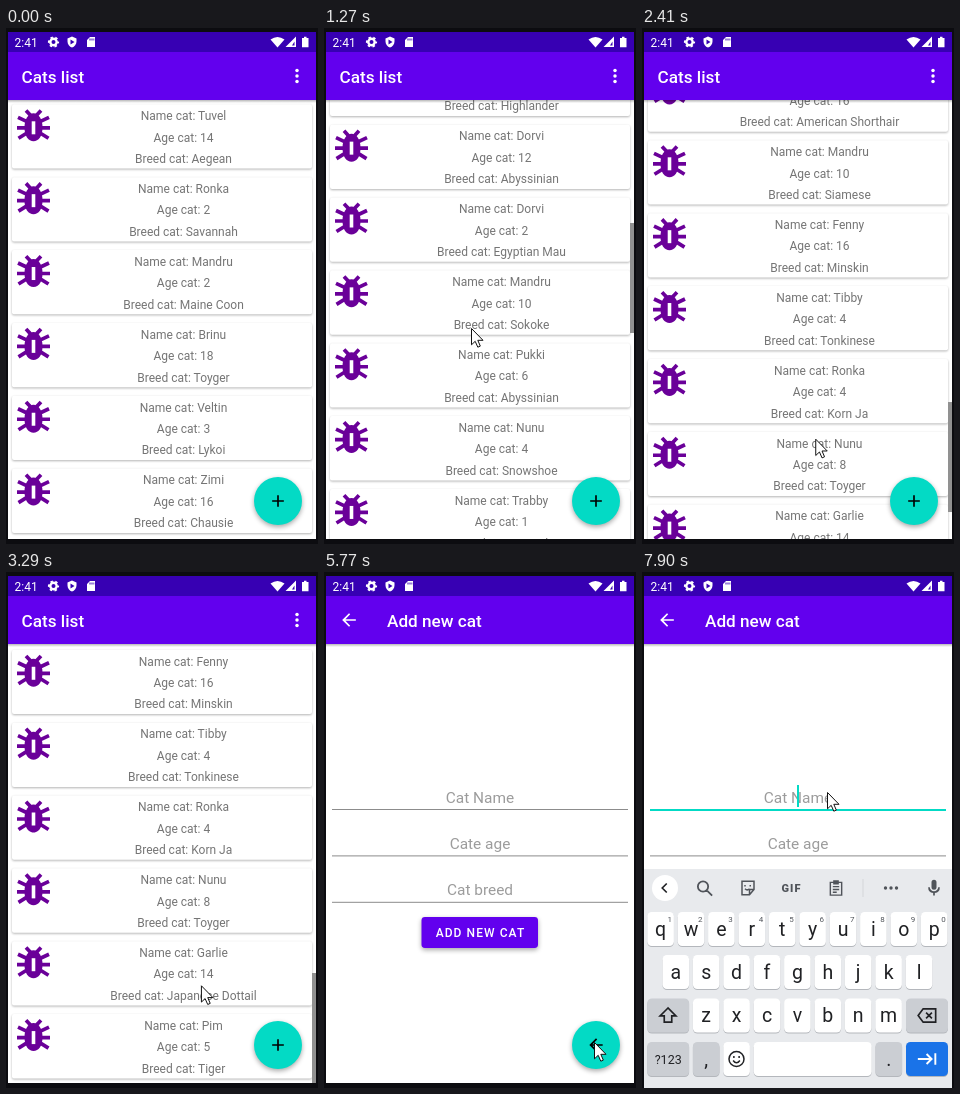
An HTML page that plays this animation: 312 px wide and 516 px high, repeating every 8 s.

```html
<!DOCTYPE html>
<html lang="en">
<head>
<meta charset="utf-8">
<title>Cats list</title>
<style>
  html, body { margin: 0; width: 100%; height: 100%; overflow: hidden; background: #0c0c10; }
  svg { display: block; font-family: Roboto, sans-serif; }
</style>
</head>
<body>
<svg id="stage" width="312" height="516" viewBox="0 0 312 516">
  <defs>
    <clipPath id="body"><rect x="2" y="72" width="308" height="439"/></clipPath>
    <clipPath id="screen"><rect x="2" y="4" width="308" height="512"/></clipPath>
    <linearGradient id="fade" x2="0" y2="1">
      <stop stop-opacity=".28"/><stop offset="1" stop-opacity="0"/>
    </linearGradient>
    <filter id="lift" x="-.3" y="-.3" width="1.6" height="1.6" color-interpolation-filters="sRGB">
      <feGaussianBlur in="SourceAlpha" stdDeviation="2.5"/>
      <feOffset dy="2"/>
      <feComponentTransfer><feFuncA type="linear" slope=".35"/></feComponentTransfer>
      <feMerge><feMergeNode/><feMergeNode in="SourceGraphic"/></feMerge>
    </filter>
    <filter id="low" color-interpolation-filters="sRGB">
      <feGaussianBlur in="SourceAlpha" stdDeviation=".9"/>
      <feOffset dy=".8"/>
      <feComponentTransfer><feFuncA type="linear" slope=".3"/></feComponentTransfer>
      <feMerge><feMergeNode/><feMergeNode in="SourceGraphic"/></feMerge>
    </filter>
    <g id="bug" fill="#6a0099" stroke="#6a0099" stroke-width="3.7">
      <path fill="none" d="M-3-11L-7.500-15.800M3-11L7.500-15.800M-7-5L-15.500-9M7-5L15.500-9M-8 1.500H-16.500M8 1.500H16.500M-7 7L-15 12M7 7L15 12"/>
      <path stroke="none" d="M0-13C5-13 9-7 9 1C9 10 5 15 0 15S-9 10-9 1C-9-7-5-13 0-13Z"/>
      <rect x="-1.800" y="-5" width="3.600" height="13" fill="#fff" stroke="none"/>
    </g>
  </defs>
</svg>
<script>
const LOOP = 8000, PITCH = 72.86, MAX_SCROLL = 1310;
const PURPLE = '#6200ee', TEAL = '#03dac5';
const stage = document.getElementById('stage');

function add(parent, tag, attrs = {}, text) {
  const node = document.createElementNS('http://www.w3.org/2000/svg', tag);
  for (const key in attrs) node.setAttribute(key, attrs[key]);
  if (text) node.textContent = text;
  return parent.appendChild(node);
}
const group = (parent, attrs) => add(parent, 'g', attrs);
const box = (parent, x, y, width, height, fill, rx = 0, more = {}) =>
  add(parent, 'rect', { x, y, width, height, fill, rx, ...more });
const label = (parent, text, x, y, size, fill, more = {}) =>
  add(parent, 'text', { x, y, 'font-size': size, fill, ...more }, text);
const centred = { 'text-anchor': 'middle' };
const medium = { 'font-weight': 500 };
const caps = { ...medium, 'letter-spacing': 1.07 };
const lifted = { filter: 'url(#lift)' };

// Icons live on a 24-unit grid around their centre.
function icon(parent, d, x, y, size, color, stroke = 0) {
  return add(parent, 'path', {
    d, transform: `translate(${x} ${y}) scale(${size / 24}) translate(-12 -12)`,
    fill: stroke ? 'none' : color, stroke: stroke ? color : 'none', 'stroke-width': stroke
  });
}
const BACK = 'M20 11H7.830L13.420 5.410L12 4L4 12L12 20L13.410 18.590L7.830 13H20Z';
const PLUS = 'M19 13H13V19H11V13H5V11H11V5H13V11H19Z';

// Screens
box(stage, 2, 72, 308, 439, '#fff');
const listScreen = group(stage, { 'clip-path': 'url(#body)' });
const list = group(listScreen);
const scrollbar = box(listScreen, 306, 72, 4, 110, '#919191');
const formScreen = group(stage, { 'clip-path': 'url(#body)' });

const cats = `Tuvel,14,Aegean Ronka,2,Savannah Mandru,2,Maine_Coon Brinu,18,Toyger Veltin,3,Lykoi
  Zimi,16,Chausie Garlie,7,Highlander Dorvi,12,Abyssinian Dorvi,2,Egyptian_Mau Mandru,10,Sokoke
  Pukki,6,Abyssinian Nunu,4,Snowshoe Trabby,1,Bengal Brinu,9,Ocicat Wompy,13,Exotic_Shorthair
  Trabby,17,Oriental_Bicolor Nunu,16,American_Shorthair Mandru,10,Siamese Fenny,16,Minskin
  Tibby,4,Tonkinese Ronka,4,Korn_Ja Nunu,8,Toyger Garlie,14,Japanese_Dottail Pim,5,Tiger`;
cats.split(/\s+/).forEach((cat, i) => {
  const [name, age, breed] = cat.replace('_', ' ').split(',');
  const card = group(list, { transform: `translate(0 ${76.3 + i * PITCH})` });
  box(card, 6, 0, 300, 64.3, '#fff', 2, { filter: 'url(#low)' });
  add(card, 'use', { href: '#bug', x: 27.5, y: 22 });
  [`Name cat: ${name}`, `Age cat: ${age}`, `Breed cat: ${breed}`].forEach((line, row) =>
    label(card, line, 177.5, 15.8 + row * 21.43, 12, '#757575', centred));
});

const underlines = ['Cat Name', 'Cate age', 'Cat breed'].map((hint, i) => {
  label(formScreen, hint, 156, 230.7 + i * 46.3, 15.43, '#9c9c9c', centred);
  return box(formScreen, 8, 237 + i * 46.4, 296, 1, '#8c8c8c');
});
const caret = box(formScreen, 155, 213, 2, 22, TEAL);
box(formScreen, 97.5, 345, 116.5, 31, PURPLE, 3.4, lifted);
label(formScreen, 'ADD NEW CAT', 156.5, 365, 12, '#fff', { ...centred, ...caps });

// App bar and status bar
box(stage, 2, 72, 308, 3, 'url(#fade)');
box(stage, 2, 24, 308, 48, PURPLE);
box(stage, 2, 4, 308, 20, '#3700b3');
const listBar = group(stage), formBar = group(stage);
label(listBar, 'Cats list', 15.5, 54.7, 17.14, '#fff', medium);
[42.5, 48, 53.5].forEach(cy => add(listBar, 'circle', { cx: 291, cy, r: 1.75, fill: '#fff' }));
icon(formBar, BACK, 25, 48, 20.5, '#fff');
label(formBar, 'Add new cat', 63, 54.7, 17.14, '#fff', medium);

label(stage, '2:41', 8.5, 18.7, 12, '#fff');
add(stage, 'circle', { cx: 47.5, cy: 14, r: 3.2, fill: 'none', stroke: '#fff', 'stroke-width': 2.4 });
add(stage, 'circle', { cx: 47.5, cy: 14, r: 4.6, fill: 'none', stroke: '#fff', 'stroke-width': 2,
  'stroke-dasharray': '2.4 2.417', 'stroke-dashoffset': 1.2 });
icon(stage, 'M12 1L3 5V11C3 16.500 7 21.500 12 23C17 21.500 21 16.500 21 11V5ZM9 7L17 12L9 17Z', 66, 14, 12, '#fff')
  .setAttribute('fill-rule', 'evenodd');
icon(stage, 'M20 2H10L4 8V22H20ZM9 5H11V9H9ZM13 5H15V9H13ZM17 5H18.500V9H17Z', 85, 14, 12, '#fff')
  .setAttribute('fill-rule', 'evenodd');
add(stage, 'path', { fill: '#fff', d: 'M264.500 11.500Q271.500 6.500 278.500 11.500L271.500 19.500Z' });
add(stage, 'path', { fill: '#fff', d: 'M279.500 19L290 8.500V19ZM286 17.500H288.500V13.500Z', 'fill-rule': 'evenodd' });
add(stage, 'path', { fill: '#fff', d: 'M296 10H298V8.700H300.500V10H302.500V19.300H296Z' });

// Floating button and snackbar
const fab = group(stage);
add(fab, 'circle', { r: 24, fill: TEAL, ...lifted });
const plus = icon(fab, PLUS, 0, 0, 20, '#000');
const arrow = icon(fab, BACK, 0, 0, 20, '#000');

const snackbar = group(stage);
box(snackbar, 9, 463, 294, 40.5, '#323232', 3.4, lifted);
label(snackbar, 'Выбран котик: Pim', 22, 487.5, 12, '#dedede');
label(snackbar, 'УДАЛИТЬ КОТИКА', 290.5, 487.5, 12, '#a677ec', { ...caps, 'text-anchor': 'end' });

// Keyboard
const keyboard = group(group(stage, { 'clip-path': 'url(#screen)' }));
const INK = '#202124', SOFT = '#50545a', GREY = '#cbced3';
box(keyboard, 2, 297, 308, 219, '#e8eaed');

function key(x, y, width, fill, text, size = 19.5) {
  box(keyboard, x, y + 1, width, 34, '#b4b7bc', 4.5);
  box(keyboard, x, y, width, 34, fill, 4.5);
  if (text) label(keyboard, text, x + width / 2, y + (size > 15 ? 23.5 : 21.5), size, INK, centred);
}
[['qwertyuiop', 5.3, 340], ['asdfghjkl', 20.5, 383], ['zxcvbnm', 50.9, 426.5]].forEach(([row, left, y], r) =>
  [...row].forEach((letter, i) => {
    const x = left + i * 30.4;
    key(x, y, 26.6, '#fff', letter);
    if (!r) label(keyboard, String((i + 1) % 10), x + 22.5, y + 9.5, 8, SOFT, centred);
  }));
key(5.3, 426.5, 41.8, GREY);
key(264, 426.5, 42, GREY);
key(5.3, 470, 41.8, GREY, '?123', 12.5);
key(50.9, 470, 26.6, GREY, ',');
key(81.3, 470, 26.6, '#fff');
key(111.7, 470, 118, '#fff');
key(233.5, 470, 26.6, GREY, '.');
key(264, 470, 42, '#1a73e8');
icon(keyboard, 'M12 3L2.500 12.500H7.500V20H16.500V12.500H21.500Z', 26, 443.5, 20, INK, 2);
icon(keyboard, 'M8 4H23V20H8L2 12ZM11.500 8.500L18.500 15.500M18.500 8.500L11.500 15.500', 284.5, 443.5, 20, INK, 2);
icon(keyboard, 'M12 2A10 10 0 1 0 12 22A10 10 0 1 0 12 2ZM7.500 14Q12 20 16.500 14M8.500 8V10.500M15.500 8V10.500', 94.5, 487, 18, INK, 2);
icon(keyboard, 'M1 12H17M11.500 6L17.500 12L11.500 18M22 5V19', 285, 487, 20, '#fff', 2.3);

add(keyboard, 'circle', { cx: 23, cy: 316, r: 13, fill: '#fff' });
icon(keyboard, 'M15 6L9 12L15 18', 22.5, 316, 18, INK, 2.2);
icon(keyboard, 'M9.500 3A6.500 6.500 0 1 0 9.500 16A6.500 6.500 0 1 0 9.500 3ZM14 14L21 21', 63, 316.5, 19, SOFT, 2.3);
icon(keyboard, 'M4 3H20V14L14 21H4ZM20 14H14V21M8 8V10M15 8V10M8 13Q11 16 14 13', 106, 316, 18, SOFT, 2);
label(keyboard, 'GIF', 149.5, 320, 11, SOFT, { ...centred, 'font-weight': 900, 'letter-spacing': 1 });
icon(keyboard, 'M4 4H20V22H4ZM9 2H15V6H9ZM7.500 10H16.500M7.500 14H16.500M7.500 18H13', 194, 316, 17, SOFT, 2);
box(keyboard, 220.5, 307, 1, 18, '#d3d6da');
[243.5, 249, 254.5].forEach(cx => add(keyboard, 'circle', { cx, cy: 316, r: 1.7, fill: SOFT }));
icon(keyboard, 'M12 2A3 3 0 0 0 9 5V11A3 3 0 0 0 15 11V5A3 3 0 0 0 12 2ZM17 11A5 5 0 0 1 7 11H5A7 7 0 0 0 11 18V21H13V18A7 7 0 0 0 19 11Z', 292, 316, 20, SOFT);

// Pointer
const pointer = group(stage);
const halo = add(pointer, 'circle', { r: 12, fill: '#faf032', opacity: .65 });
add(pointer, 'path', { d: 'M.500.500V16.800L4.200 13.300L6.800 19.200L9.300 18.100L6.800 12.300H12Z', fill: '#fff', stroke: '#111', 'stroke-width': 1 });

// Tracks: [time, value, ...] with straight runs in between.
const path = [[180, 196, 516], [300, 188, 490], [580, 142, 446], [720, 142, 446], [1000, 147, 300],
  [1300, 147, 300], [1500, 152, 420], [1620, 152, 420], [1850, 157, 232], [2050, 157, 232],
  [2450, 175, 430], [2700, 175, 430], [3000, 190, 265], [3190, 190, 265], [3290, 195, 413],
  [3480, 180, 468], [4030, 180, 468], [4600, 226, 488], [4700, 228, 488], [5170, 228, 488],
  [5450, 270, 470], [6040, 270, 470], [6650, 189, 228], [6900, 189, 228], [7200, 185, 220]];
const scroll = [[720, 0], [1000, 146], [1270, 489], [1420, 590], [1600, 640], [1850, 828], [1940, 1002],
  [2100, 1120], [2350, 1200], [2700, 1215], [3000, MAX_SCROLL]];
const barFade = [[720, 0], [770, 1], [3330, 1], [3580, 0]];
const snackShow = [[3600, 0], [3760, 1], [4780, 1], [4850, 0]];
const keysHidden = [[6930, 1], [7230, 0]];
const presses = [[700, 1010], [1600, 1860], [2680, 3010], [3440, 3600], [4745, 4835], [5480, 5700], [6700, 6900]];

function at(track, t) {
  const next = track.findIndex(point => point[0] > t);
  if (next === 0) return track[0].slice(1);
  if (next < 0) return track[track.length - 1].slice(1);
  const a = track[next - 1], b = track[next], k = (t - a[0]) / (b[0] - a[0]);
  return a.slice(1).map((value, i) => value + (b[i + 1] - value) * k);
}
const show = (node, on) => node.setAttribute('display', on ? 'inline' : 'none');
const move = (node, x, y) => node.setAttribute('transform', `translate(${x} ${y})`);

function draw(t) {
  const [offset] = at(scroll, t), [snack] = at(snackShow, t), [hidden] = at(keysHidden, t);
  const form = t >= 5620, focused = t >= 6900;

  move(list, 0, -offset);
  move(scrollbar, 0, offset / MAX_SCROLL * 329);
  scrollbar.setAttribute('opacity', at(barFade, t)[0]);
  [listScreen, listBar, plus].forEach(node => show(node, !form));
  [formScreen, formBar, arrow].forEach(node => show(node, form));

  move(fab, 272, 473 - 48 * snack);
  const scale = .8 + .2 * snack;
  show(snackbar, snack > 0);
  snackbar.setAttribute('opacity', snack);
  snackbar.setAttribute('transform', `translate(156 483) scale(${scale}) translate(-156 -483)`);

  underlines[0].setAttribute('fill', focused ? TEAL : '#8c8c8c');
  underlines[0].setAttribute('height', focused ? 2 : 1);
  show(caret, focused && Math.floor((t - 6900) / 500) % 2 === 0);
  show(keyboard, hidden < 1);
  move(keyboard, 0, 219 * hidden * hidden);

  show(pointer, t >= 180);
  move(pointer, ...at(path, t));
  show(halo, presses.some(([from, to]) => t >= from && t < to));
}

const start = performance.now();
(function tick() {
  draw((performance.now() - start) % LOOP);
  requestAnimationFrame(tick);
})();
</script>
</body>
</html>
```
